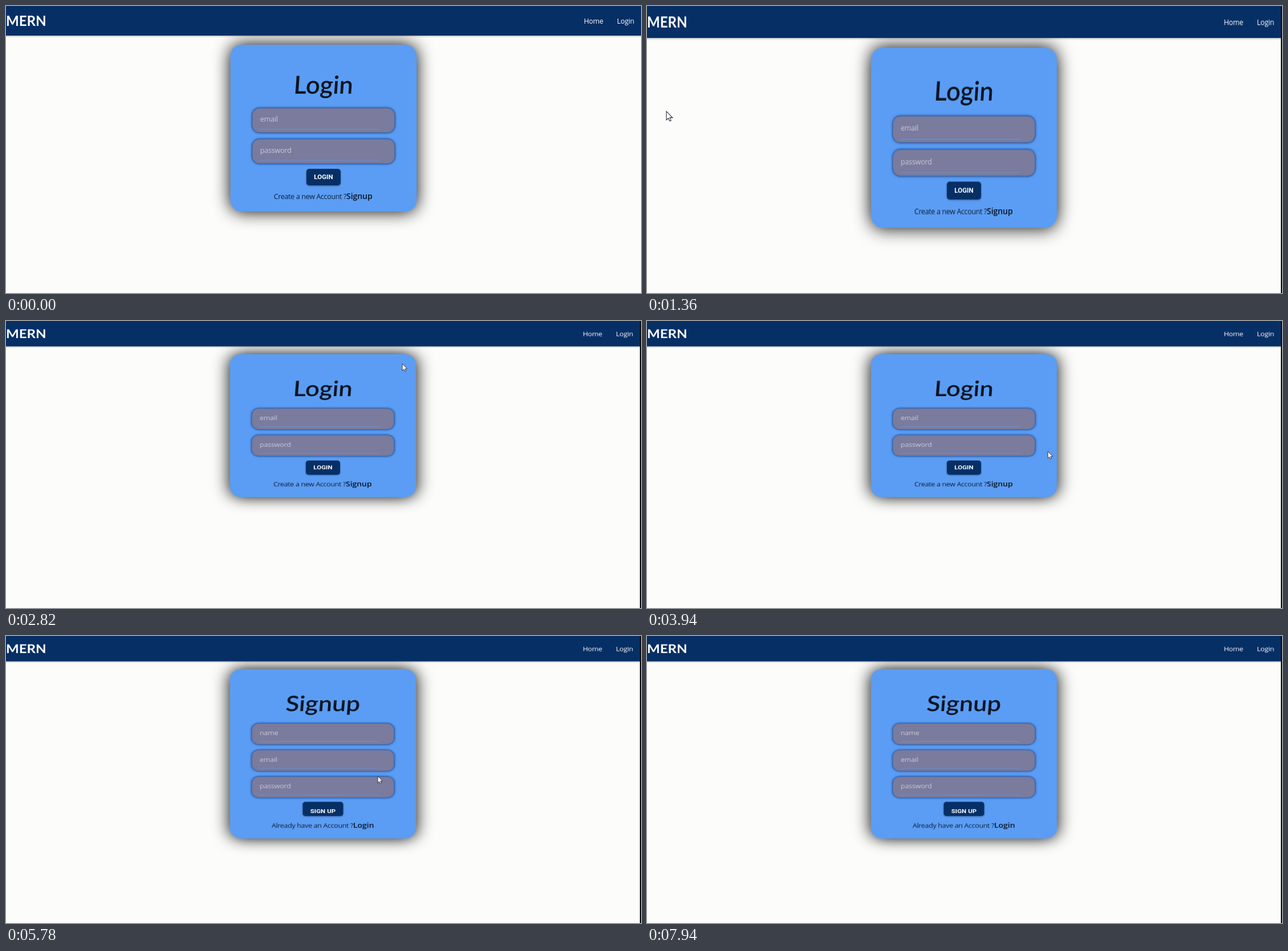
An HTML page with a canvas that plays this animation: 1112 by 504 pixels, repeating every 8000 ms.

```html
<!DOCTYPE html>
<html lang="en">
<head>
<meta charset="utf-8">
<title>Login and signup</title>
<style>
  html, body { margin: 0; width: 100%; height: 100%; overflow: hidden; background: #fcfdfb; }
  canvas { display: block; }
</style>
</head>
<body>
<canvas id="stage" width="1112" height="504"></canvas>
<script>
const W = 1112, H = 504, PAGE_H = 600, LOOP = 8000;
const stage = document.getElementById('stage').getContext('2d');

// The page is painted at natural size, then stretched onto the stage.
const sheet = document.createElement('canvas');
sheet.width = W;
sheet.height = PAGE_H;
const ctx = sheet.getContext('2d');

const CX = 556, FIELD_TOP = 179, FIELD_STEP = 54.5, FIELD_H = 43.5;
const PAPER = '#fcfdfb', NAVY = '#062f65', CARD = '#5b9df4', INK = '#0a1420';
const BODY = '"Open Sans", sans-serif', TITLE = 'Lato, sans-serif', BUTTON = 'Roboto, sans-serif';

const pages = {
  login: {
    title: 'Login', fields: ['email', 'password'], bottom: 361,
    button: { label: 'LOGIN', width: 60, top: 286, base: 304 },
    prompt: { text: 'Create a new Account ?', link: 'Signup', x: 469, linkX: 596, base: 339 }
  },
  signup: {
    title: 'Signup', fields: ['name', 'email', 'password'], bottom: 415,
    button: { label: 'SIGN UP', width: 71, top: 340, base: 363 },
    prompt: { text: 'Already have an Account ?', link: 'Login', x: 466, linkX: 609, base: 393 }
  }
};

// Pointer journeys: [time, x, y]
const pointerPath = [
  [970, 16, 245], [1360, 34, 185], [1600, 163, 159], [1820, 163, 159],
  [1890, 430, 40], [1970, 694, 94], [2820, 694, 94]
];
const pointerPathLate = [
  [2820, 694, 75], [3580, 694, 75], [3940, 702, 229], [4330, 708, 247],
  [4400, 708, 247], [4850, 604, 296], [5090, 616, 290], [5370, 616, 290],
  [5780, 651, 246], [6170, 449, 168]
];

function positionAt(path, t) {
  const i = path.findIndex(p => p[0] > t);
  if (i < 0) return path[path.length - 1].slice(1);
  const [t0, x0, y0] = path[i - 1], [t1, x1, y1] = path[i];
  const u = (t - t0) / (t1 - t0), e = u * u * (3 - 2 * u);
  return [x0 + (x1 - x0) * e, y0 + (y1 - y0) * e];
}

function box(x, y, w, h, r, fill, shadow, blur, dy = 0) {
  ctx.save();
  ctx.shadowColor = shadow;
  ctx.shadowBlur = blur;
  ctx.shadowOffsetY = dy;
  ctx.fillStyle = fill;
  ctx.beginPath();
  ctx.roundRect(x, y, w, h, r);
  ctx.fill();
  ctx.restore();
}

function text(str, x, y, font, color, spacing = 0, align = 'left') {
  ctx.font = font;
  ctx.fillStyle = color;
  ctx.letterSpacing = spacing + 'px';
  ctx.textAlign = align;
  ctx.fillText(str, x, y);
}

function drawTitle(str) {
  ctx.save();
  ctx.translate(CX, 154);
  ctx.transform(1, 0, -0.07, 1, 0, 0);
  text(str, -1, 0, `600 43.5px ${TITLE}`, INK, 0, 'center');
  ctx.restore();
}

function drawField(label, i) {
  const y = FIELD_TOP + i * FIELD_STEP;
  box(431, y, 250, FIELD_H, 13, '#7a7b9d', '#0a3c86', 4);
  ctx.strokeStyle = '#315fa6';
  ctx.lineWidth = 1;
  ctx.beginPath();
  ctx.roundRect(431, y, 250, FIELD_H, 13);
  ctx.stroke();
  ctx.fillStyle = '#6f90cf';
  ctx.fillRect(445, y + 37, 209, 1);
  text(label, 445, y + 24, `12.5px ${BODY}`, '#c9cad8', -0.2);
}

function drawCard(page) {
  const { button, prompt } = page;
  box(393, 68, 326, page.bottom - 68, 20, CARD, '#000', 30);
  drawTitle(page.title);
  page.fields.forEach(drawField);
  box(CX - button.width / 2, button.top, button.width, 29, 5, NAVY, 'rgba(0,0,0,.4)', 3, 1);
  text(button.label, CX, button.base, `bold 11.6px ${BUTTON}`, '#fff', 0, 'center');
  text(prompt.text, prompt.x, prompt.base, `12.5px ${BODY}`, '#102038', -0.35);
  text(prompt.link, prompt.linkX, prompt.base, `600 14px ${BODY}`, INK, -0.05);
}

function drawNav() {
  box(-10, -10, W + 20, 62, 0, NAVY, 'rgba(0,0,0,.3)', 3, 1);
  text('MERN', 0, 35, `bold 24px ${TITLE}`, '#fff');
  text('Home', 1012, 31, `12.3px ${BODY}`, '#fff', -0.2);
  text('Login', 1070, 31, `12.3px ${BODY}`, '#fff', -0.2);
}

function caretVisible(t) {
  return (t >= 6340 && t < 6890) || (t >= 7430 && t < 7940);
}

function drawPage(t) {
  ctx.fillStyle = PAPER;
  ctx.fillRect(0, 0, W, PAGE_H);
  drawCard(t < 5370 ? pages.login : pages.signup);
  drawNav();
  if (caretVisible(t)) {
    ctx.fillStyle = '#14141c';
    ctx.fillRect(445, 188, 1, 19);
  }
}

const arrow = new Path2D('M0 0V16L3.7 12.7 6 18 8.5 17 6.2 11.7H11.2Z');
const hand = new Path2D('M4 1.2C4-.4 6.3-.4 6.3 1.2V6.5C7 5.8 8.5 6 8.6 7 9.4 6.4 10.8 6.7 10.9 7.7 ' +
  '11.8 7.2 13 7.7 13 8.9V12L11.5 16H5L.6 10.6C-.2 9.3 1.5 8.2 2.5 9.3L4 10.6Z');
const beam = new Path2D('M-2-7H2M0-7V7M-2 7H2');

function drawPointer(t) {
  if (t < 970 || t >= 6170) return;
  const [x, y] = positionAt(t < 2820 ? pointerPath : pointerPathLate, t);
  const onLink = t >= 4850 && t < 5400;
  const onInput = t > 5900 && x < 640;
  const size = t < 1820 ? 0.95 : 0.76;
  stage.save();
  stage.translate(x, y);
  stage.lineWidth = 1.1;
  stage.strokeStyle = '#1c1c28';
  if (onInput) {
    stage.stroke(beam);
  } else {
    if (onLink) stage.translate(-5, 0);
    else stage.scale(size, size);
    const shape = onLink ? hand : arrow;
    stage.fillStyle = '#fff';
    stage.fill(shape);
    stage.stroke(shape);
  }
  stage.restore();
}

function draw(t) {
  const resized = t >= 60;
  const stretch = !resized ? 1 : t < 2820 ? 1.0785 : 0.8567;
  drawPage(t);
  stage.fillStyle = '#080a10';
  stage.fillRect(0, 0, W, H);
  stage.drawImage(sheet, 0, 0, resized ? 1110 : W, PAGE_H * stretch);
  drawPointer(t);
}

const start = performance.now();
function frame() {
  draw((performance.now() - start) % LOOP);
  requestAnimationFrame(frame);
}
frame();
</script>
</body>
</html>
```
